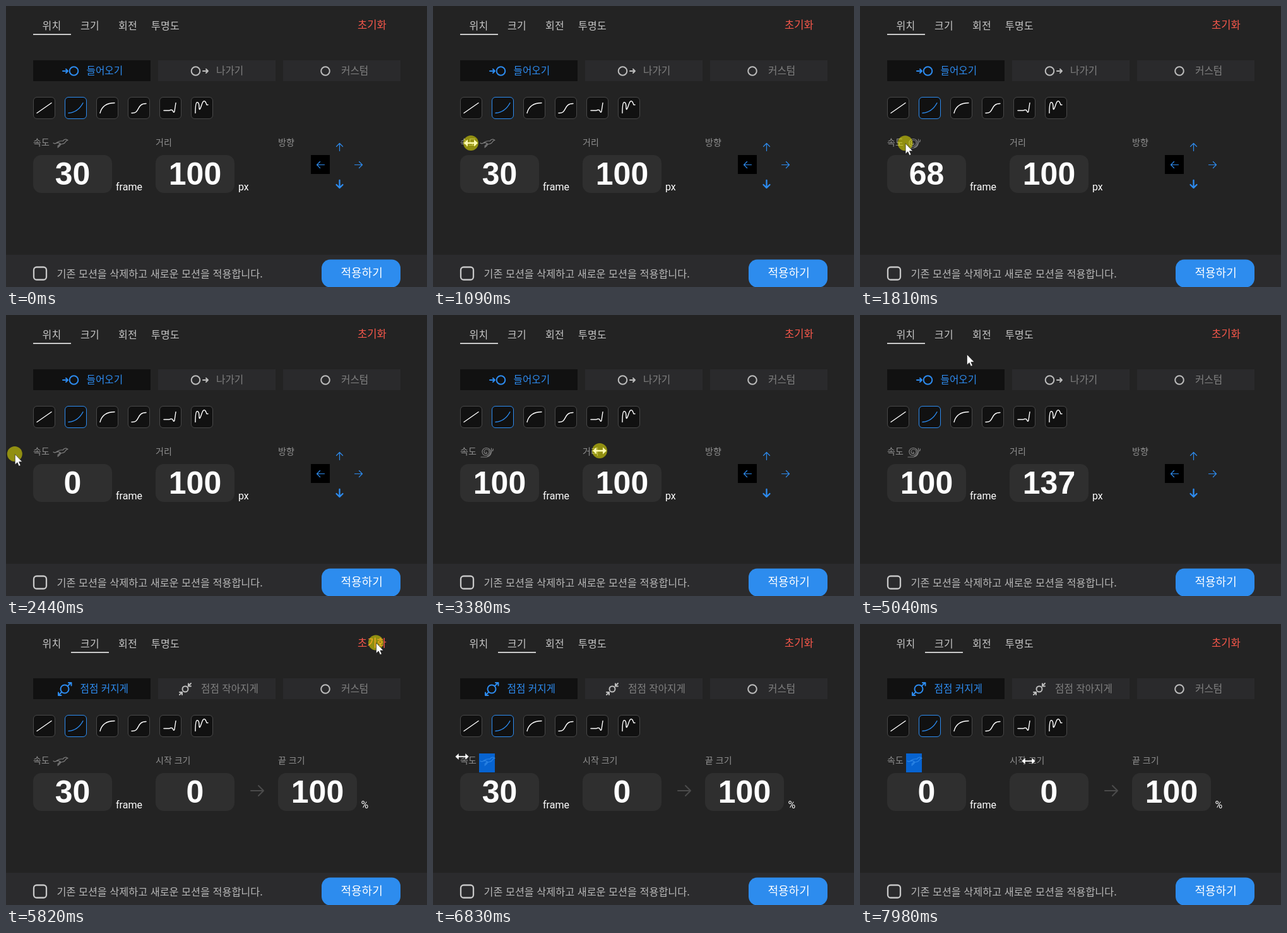
An HTML page for the animation above (8000 ms loop, 667 px wide and 445 px high).

```html
<!DOCTYPE html>
<html lang="ko">
<head>
<meta charset="utf-8">
<style>
html, body { margin: 0; width: 100%; height: 100%; overflow: hidden; background: #232323; }
svg { display: block; font-family: "Noto Sans CJK KR", "Noto Sans CJK", sans-serif; }
text { font-size: 15.7px; }
.tab { font-size: 16px; letter-spacing: .3px; fill: #c8c8c8; font-weight: 500; }
.on { fill: #2d8cf0; font-weight: 500; }
.off { fill: #808080; }
.label { font-size: 14px; fill: #909090; }
.num { font: bold 50px "Liberation Sans", Arial, sans-serif; fill: #fff; text-anchor: middle; }
.unit { font: 16px Roboto, sans-serif; fill: #fff; }
.box { fill: #2f2f2f; }
.line { fill: none; stroke-width: 2; stroke-linecap: round; stroke-linejoin: round; }
.thin { stroke-width: 1.2; }
.blue { stroke: #2d8cf0; }
.grey { stroke: #bdbdbd; }
.pressed #resize { fill: #fffbb0; stroke: none; }
</style>
</head>
<body>
<svg width="667" height="445" viewBox="0 0 667 445">
  <defs>
    <rect id="field" width="125" height="60" rx="13"/>
    <rect id="button" y="86" width="186" height="33"/>
    <circle id="ring" r="6.8"/>
    <path id="tip" d="M0 0H8M5 -3l3 3l-3 3"/>
    <path id="dir" d="M-6 0H6M1 -5l5 5l-5 5"/>
  </defs>
  <rect width="667" height="445" fill="#232323"/>
  <rect y="394" width="667" height="51" fill="#2b2b2d"/>

  <text class="tab" x="57.5" y="36.5">위치</text>
  <text class="tab" x="118" y="36.5">크기</text>
  <text class="tab" x="178" y="36.5">회전</text>
  <text class="tab" x="230" y="36.5">투명도</text>
  <rect id="underline" x="43" y="44" width="60" height="2" fill="#c8c8c8"/>
  <text x="557" y="36" style="font-size:16.6px" fill="#f4574a">초기화</text>

  <use href="#button" x="43" fill="#111"/>
  <use href="#button" x="241" fill="#2a2a2c"/>
  <use href="#button" x="439" fill="#2a2a2c"/>
  <use href="#ring" class="line grey" x="506" y="103"/>
  <text class="off" x="531" y="107.5">커스텀</text>

  <g id="curves"></g>

  <text class="label" x="43" y="221">속도</text>
  <rect id="mark" x="73" y="205" width="25" height="30" fill="#0763d0"/>
  <g id="gait" class="line thin">
    <path id="fast" d="M75 217q3 2 6-1q5-3 9-2q2-3 5-3l3 1.500q-3 .5-4 3q-2 3-5 3q-3 0-4 3l-3 2.500M81 217q3-1 5 1l-4 4"/>
    <path id="slow" d="M84 217a1.500 1.500 0 0 1 1 2.500a3 3 0 0 1-4-3a4 4 0 0 1 8 .5a5.500 5.500 0 0 1-11 0a6.500 6 0 0 1 13-1q0 6-5 8M76 225h9q7-1 8-10h2l.5-3M93 215l-.5-4"/>
  </g>
  <use href="#field" class="box" x="43" y="236"/>
  <text id="speed" class="num" x="105.5" y="283"></text>
  <text class="unit" x="174" y="292">frame</text>
  <use href="#field" class="box" x="237" y="236"/>
  <text id="value" class="num" x="299.5" y="283"></text>

  <g id="move">
    <g class="line blue">
      <use href="#tip" x="90" y="103"/>
      <use href="#ring" x="107.5" y="103"/>
    </g>
    <text class="on" x="127.5" y="107.5">들어오기</text>
    <g class="line grey">
      <use href="#ring" x="300.5" y="103"/>
      <use href="#tip" x="312" y="103"/>
    </g>
    <text class="off" x="333" y="107.5">나가기</text>
    <text class="label" x="237" y="221">거리</text>
    <text class="unit" x="368" y="292">px</text>
    <text class="label" x="431" y="221">방향</text>
    <rect x="483" y="236" width="30" height="30" fill="#000"/>
    <g class="line thin blue">
      <use href="#dir" transform="translate(528.5 223.5) rotate(-90)"/>
      <use href="#dir" transform="translate(498.5 251.5) rotate(180)"/>
      <use href="#dir" transform="translate(558.5 251.5)"/>
      <use href="#dir" transform="translate(528.5 282) rotate(90)" stroke-width="2.3" style="stroke-width:2.3"/>
    </g>
  </g>

  <g id="scale">
    <g class="line blue">
      <circle cx="93" cy="103" r="6.5"/>
      <path d="M98 98l5-5M99 93h4.500v4.500M88 108l-5 5M83 108.500v4.500h4.500"/>
    </g>
    <text class="on" x="117.5" y="107.5">점점 커지게</text>
    <g class="line grey">
      <circle cx="284" cy="103" r="4.5"/>
      <path d="M293 94l-4 4M289 94.500v4h4M275 112l4-4M275 108h4v4"/>
    </g>
    <text class="off" x="309" y="107.5">점점 작아지게</text>
    <text class="label" x="237" y="221">시작 크기</text>
    <path class="line" stroke="#4b4b4b" d="M388 264H408M400 256l8 8l-8 8"/>
    <text class="label" x="431" y="221">끝 크기</text>
    <use href="#field" class="box" x="431" y="236"/>
    <text class="num" x="493.5" y="283">100</text>
    <text class="unit" x="562.5" y="292">%</text>
  </g>

  <rect x="44" y="413.5" width="20" height="20" rx="4.5" fill="none" stroke="#c8c8c8" stroke-width="2.3"/>
  <text x="80.5" y="429.5" style="font-size:16.25px" fill="#b8b8b8">기존 모션을 삭제하고 새로운 모션을 적용합니다.</text>
  <rect x="500" y="401.5" width="125" height="44" rx="14" fill="#2d8cee"/>
  <text x="530.5" y="428.5" style="font-size:18px;font-weight:500" fill="#fff">적용하기</text>

  <g id="cursor">
    <circle id="press" r="12" fill="#fffb00" fill-opacity=".5"/>
    <path id="arrow" d="M.5 .5V17l3.700-3.500l2.500 5.700l2.600-1.100l-2.500-5.600H12z" fill="#fff" stroke="#111" stroke-width=".6"/>
    <path id="resize" d="M-11 0l6-5.500v4.200h10v-4.200l6 5.500l-6 5.500v-4.200h-10v4.200z" fill="#fff" stroke="#111" stroke-width=".6"/>
  </g>
</svg>
<script>
const LOOP = 8000, SWITCH = 5300, SELECT = 6500;
const $ = id => document.getElementById(id);
const show = (id, on) => $(id).style.display = on ? "" : "none";

// Easing previews, drawn from the lower left of each tile
$("curves").innerHTML = [
  "l23-16", "q15-1 23-16", "q4-16 23-16", "c14 1 7-15 23-15",
  "m1-4h9q3-2 5 0q2 5 3 1l2-13", "m1 0q0-17 3-17t3 8t4-4t8 0h2"
].map((d, i) => `<g transform="translate(${43.5 + 50 * i} 144.5)">
  <rect width="34" height="34" rx="5.5" fill="#111" stroke="${i == 1 ? "#2d8cf0" : "#484848"}"/>
  <path class="line" style="stroke-width:1.4" stroke="${i == 1 ? "#2d8cf0" : "#fff"}" d="M5.5 25${d}"/>
</g>`).join("");

// Cursor stops: time, x, y
const stops = [
  [270, 600, 450], [950, 60, 217], [1090, 60, 217], [1580, 17, 212],
  [2090, 144, 224], [2480, 10, 220], [2630, 10, 220], [3380, 264, 215],
  [3480, 264, 215], [3827, 109, 212], [4400, 231, 223], [5040, 169, 62],
  [5250, 133, 30], [5400, 133, 30], [5780, 590, 28], [6590, 46, 210],
  [6840, 46, 210], [7150, 12, 207], [7860, 296, 228], [7980, 267, 217]
];
const clicks = [5300, 5800];
const drags = {
  speed: { from: 1090, to: 3430, value: 30, gain: 1.24, max: 100 },
  distance: { from: 3480, to: 4430, value: 100, gain: 1.13, max: 999 },
  grow: { from: 6840, to: 7160, value: 30, gain: 1.24, max: 100 }
};

function cursorAt(t) {
  const i = stops.findIndex(s => s[0] > t);
  if (i < 1) return stops[i ? stops.length - 1 : 0].slice(1);
  const [a, x, y] = stops[i - 1], [b, x2, y2] = stops[i];
  const u = (t - a) / (b - a), e = u * u * (3 - 2 * u);
  return [x + (x2 - x) * e, y + (y2 - y) * e];
}

// A dragged number follows the cursor and sticks at its limits
function dragged({ from, to, value, gain, max }, t) {
  const end = Math.min(t, to);
  if (end <= from) return value;
  const times = [...stops.map(s => s[0]).filter(s => s > from && s < end), end];
  let [x] = cursorAt(from);
  for (const time of times) {
    const [next] = cursorAt(time);
    value = Math.max(0, Math.min(max, value + gain * (next - x)));
    x = next;
  }
  return Math.round(value);
}

function draw(t) {
  const [x, y] = cursorAt(t);
  const second = t >= SWITCH, marked = t >= SELECT;
  const frames = dragged(second ? drags.grow : drags.speed, t);
  const onLabel = y > 204 && y < 229 && (x > 40 && x < 70 || x > 217 && x < 278);
  const pressed = clicks.some(c => Math.abs(t - c) < 40) ||
    Object.values(drags).some(d => t > d.from && t < d.to);

  $("speed").textContent = frames;
  $("value").textContent = second ? 0 : dragged(drags.distance, t);
  $("underline").setAttribute("x", second ? 103 : 43);
  show("move", !second);
  show("scale", second);

  show("mark", marked);
  $("gait").setAttribute("stroke", marked ? "#2d86e6" : "#808080");
  show("fast", frames <= 50);
  show("slow", frames > 50);

  show("cursor", t >= stops[0][0]);
  $("cursor").setAttribute("transform", `translate(${x.toFixed(1)} ${y.toFixed(1)})`);
  $("cursor").classList.toggle("pressed", pressed);
  show("press", pressed);
  show("arrow", !onLabel);
  show("resize", onLabel);
}

const start = performance.now();
function tick() {
  draw((performance.now() - start) % LOOP);
  requestAnimationFrame(tick);
}
tick();
</script>
</body>
</html>
```
